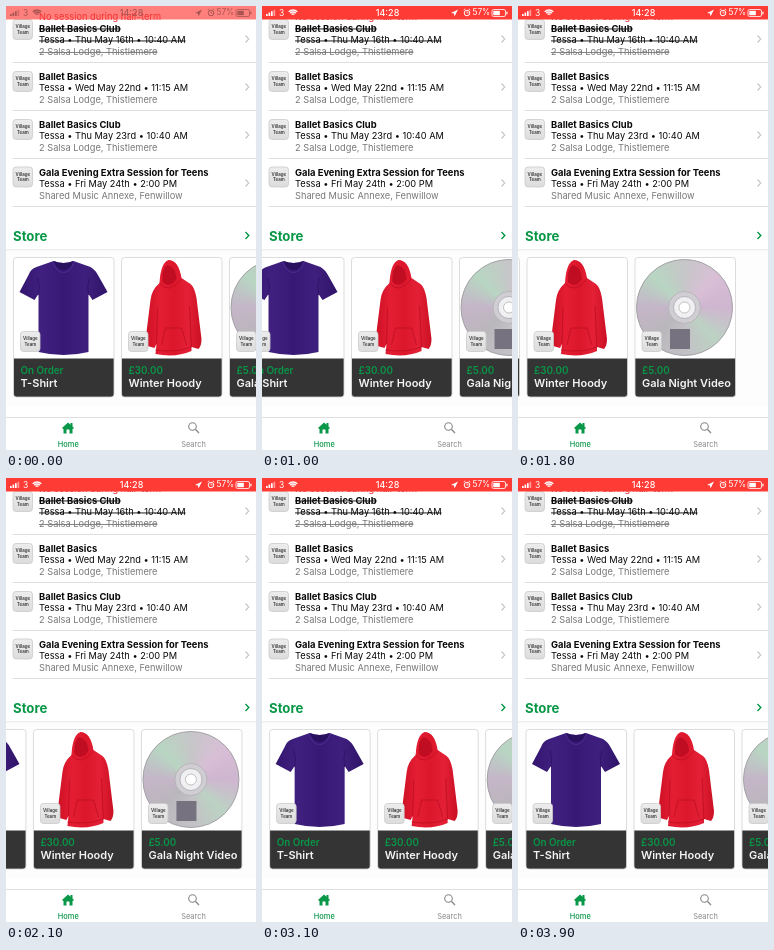
Animation of 250 by 444 pixels, one loop 4 s. Source, as an HTML page with a canvas:

```html
<!DOCTYPE html>
<html lang="en">
<head>
<meta charset="utf-8">
<title>Club app store</title>
<style>
  html, body { margin: 0; width: 100%; height: 100%; overflow: hidden; background: #fff; }
  canvas { display: block; width: 250px; height: 444px; }
</style>
</head>
<body>
<canvas id="stage"></canvas>
<script>
const W = 250, H = 444, LOOP = 4000, STEP = 100;
const FONT = 'Inter, "Liberation Sans", sans-serif';
const GREEN = '#079747', GREY = '#787878';
const canvas = document.getElementById('stage');
const ctx = canvas.getContext('2d');
const ratio = window.devicePixelRatio || 1;
canvas.width = W * ratio;
canvas.height = H * ratio;
ctx.scale(ratio, ratio);

// Scroll position of the shelf: [ms, px], including both overscroll bounces.
const scrollKeys = [
  [0, 0], [700, 0], [1000, 26], [1400, 86], [1800, 106.5], [2200, 83.5],
  [2450, 81], [2550, 80.5], [3400, -31.5], [3650, -10], [3900, -0.5], [4000, 0]
];

const rows = [
  { y: 22, icon: 13.5, struck: true, lines: ['Ballet Basics Club', 'Tessa • Thu May 16th • 10:40 AM', '2 Salsa Lodge, Thistlemere'] },
  { y: 70, icon: 65.5, lines: ['Ballet Basics', 'Tessa • Wed May 22nd • 11:15 AM', '2 Salsa Lodge, Thistlemere'] },
  { y: 118, icon: 113.5, lines: ['Ballet Basics Club', 'Tessa • Thu May 23rd • 10:40 AM', '2 Salsa Lodge, Thistlemere'] },
  { y: 166, icon: 161, lines: ['Gala Evening Extra Session for Teens', 'Tessa • Fri May 24th • 2:00 PM', 'Shared Music Annexe, Fenwillow'] }
];
const products = [
  { price: 'On Order', title: 'T-Shirt', draw: drawShirt },
  { price: '£30.00', title: 'Winter Hoody', draw: drawHoody },
  { price: '£5.00', title: 'Gala Night Video', draw: drawDisc }
];

function text(str, x, y, size, color, weight = 400, align = 'left') {
  ctx.font = `${weight} ${size}px ${FONT}`;
  ctx.textAlign = align;
  ctx.textBaseline = 'middle';
  ctx.fillStyle = color;
  ctx.fillText(str, x, y);
  return ctx.measureText(str).width;
}

function rect(x, y, w, h, color) {
  ctx.fillStyle = color;
  ctx.fillRect(x, y, w, h);
}

function roundRect(x, y, w, h, r, fill, stroke) {
  ctx.beginPath();
  ctx.roundRect(x, y, w, h, r);
  if (fill) { ctx.fillStyle = fill; ctx.fill(); }
  if (stroke) { ctx.strokeStyle = stroke; ctx.lineWidth = 0.8; ctx.stroke(); }
}

function path(d, fill, stroke, width = 1) {
  const p = new Path2D(d);
  if (fill) { ctx.fillStyle = fill; ctx.fill(p); }
  if (stroke) { ctx.strokeStyle = stroke; ctx.lineWidth = width; ctx.stroke(p); }
}

function circle(x, y, r, fill, stroke, width = 1) {
  ctx.beginPath();
  ctx.arc(x, y, r, 0, Math.PI * 2);
  if (fill) { ctx.fillStyle = fill; ctx.fill(); }
  if (stroke) { ctx.strokeStyle = stroke; ctx.lineWidth = width; ctx.stroke(); }
}

function addStops(g, colors) {
  colors.forEach((c, i) => g.addColorStop(i / (colors.length - 1), c));
  return g;
}

function gradient(x0, y0, x1, y1, ...colors) {
  return addStops(ctx.createLinearGradient(x0, y0, x1, y1), colors);
}

function badge(x, y) {
  roundRect(x, y, 19.5, 20, 3, gradient(x, y, x, y + 20, '#ededed', '#dcdcdc'), '#cbcbcb');
  text('Village', x + 9.8, y + 7.5, 4.4, '#333', 600, 'center');
  text('Team', x + 9.8, y + 13, 4.4, '#333', 600, 'center');
}

function chevron(y, color, width = 1.1) {
  path(`M239.5 ${y - 3.5}l3.3 3.5l-3.3 3.5`, null, color, width);
}

// Monotone cubic interpolation through the scroll keys.
function scrollAt(t) {
  const k = scrollKeys;
  const slope = i => (k[i + 1][1] - k[i][1]) / (k[i + 1][0] - k[i][0]);
  const tangent = i => {
    if (i === 0 || i === k.length - 1) return 0;
    const a = slope(i - 1), b = slope(i);
    return a * b <= 0 ? 0 : 2 * a * b / (a + b);
  };
  let i = 0;
  while (i < k.length - 2 && t >= k[i + 1][0]) i++;
  const h = k[i + 1][0] - k[i][0], u = (t - k[i][0]) / h, v = 1 - u;
  return k[i][1] * v * v * (1 + 2 * u) + k[i + 1][1] * u * u * (3 - 2 * u)
    + h * u * v * (tangent(i) * v - tangent(i + 1) * u);
}

function drawRow({ y, icon, struck, lines }) {
  badge(7, icon);
  lines.forEach((line, i) => {
    const ly = y + [0, 12, 23.5][i];
    const color = i === 2 ? GREY : '#080808';
    const w = text(line, 33, ly + 0.7, i ? 9.25 : 9.4, color, i ? 400 : 700);
    if (struck) rect(33, ly + 0.5, w, 0.9, color);
  });
  chevron(y + 11, '#c4c4c4');
  rect(7, y + 34, W - 7, 0.7, '#cfcfcf');
}

// Product art uses card-relative x and stage y.
function drawShirt() {
  path('M40 255Q50 259 60 255L77 261Q82 264 85 270L94 286L79 294L75 288V346Q50 352 25 346V288L21 294L6 286L15 269Q17 263 23 261Z',
    gradient(6, 0, 94, 0, '#331670', '#40207f', '#371975', '#3f1f7e', '#2f1468'));
  path('M40 255Q50 259 60 255Q57 264 50 264Q43 264 40 255Z', '#2a115f');
  path('M39.5 256Q43 266.5 50 266.5Q57 266.5 60.500 256', null, '#4d2c90', 1);
  path('M25 289Q27 280 24 272M75 289Q73 280 76 272', null, '#2a115f', 0.7);
}

function drawHoody() {
  path('M38 277Q39 257 47 254Q57 254 60 272L69 278Q73 281 75 292L80 333Q80 340 77 343L70 341V345Q54 352 34 348L35 338L33 342L26 340Q24 330 26 318L29 294Q30 284 38 277Z',
    gradient(25, 0, 80, 0, '#cf1226', '#e41d33', '#dc172c', '#e42036', '#cb1024'));
  path('M41 276Q40 262 46 259Q54 261 55 273Q48 283 41 276Z', '#c10d21');
  path('M38 277Q47 289 60 273M35 338L36 302M70 341L68 300M40 339L44 322H60L65 339M34 344Q54 347 70 341', null, '#b80e21', 0.7);
}

function drawDisc() {
  const cx = 49.5, cy = 301.5;
  const sheen = addStops(ctx.createConicGradient(-Math.PI / 2, cx, cy), [
    '#c6c6c8', '#d8bfd6', '#cfb6d0', '#bcd2c3', '#c3c1c6', '#b9b7bb', '#c5b5c8', '#b8d6c2', '#c6c6c8'
  ]);
  circle(cx, cy, 48, sheen, '#a3a1a5');
  circle(cx, cy, 16, '#d0ced2', '#b2b0b4', 0.8);
  circle(cx, cy, 11, '#f0eff1', '#a3a1a6', 0.7);
  circle(cx, cy, 5.5, '#fff', '#aaa', 0.7);
  rect(35, 323, 20, 20, '#76727f');
}

function drawCard(product, x) {
  ctx.save();
  ctx.translate(x, 0);
  ctx.save();
  roundRect(0, 251.5, 100.5, 139.500, 3, '#fff');
  ctx.clip();
  product.draw();
  rect(0, 352.5, 101, 39, '#343434');
  ctx.restore();
  roundRect(0, 251.5, 100.5, 139.500, 3, null, '#d4d4d4');
  badge(7, 325.5);
  text(product.price, 7, 365.5, 9.8, GREEN, 600);
  text(product.title, 7, 378, 11, '#f4f4f4', 600);
  ctx.restore();
}

// The bar starts out half faded with dark symbols, then turns solid.
function drawStatus(t) {
  const faded = t < STEP;
  const ink = faded ? '#a85552' : '#fff';
  ctx.save();
  ctx.globalAlpha = faded ? 0.65 : 1;
  rect(0, 0, W, 13.5, '#ff3b36');
  ctx.restore();
  for (let i = 0; i < 4; i++) {
    ctx.globalAlpha = i < 3 ? 1 : 0.5;
    rect(4 + i * 2.5, 8 - i * 1.4, 1.7, 2 + i * 1.4, ink);
  }
  ctx.globalAlpha = 1;
  text('3', 17, 7, 8.5, ink);
  for (const r of [2, 4, 6]) {
    ctx.beginPath();
    ctx.arc(31, 10, r, -Math.PI * 0.75, -Math.PI * 0.25);
    ctx.strokeStyle = ink;
    ctx.lineWidth = 1.4;
    ctx.stroke();
  }
  text('14:28', 125.5, 7, 9, ink, 500, 'center');
  path('M189 7L196 3.500L192.500 10.500L192 7.500Z', ink);
  circle(205, 7, 2.8, null, ink);
  path('M205 5.500V7H206.500M201.700 4L203.200 2.800M208.300 4L206.800 2.800', null, ink, 0.8);
  text('57%', 210.5, 7, 8.3, ink);
  roundRect(230, 3.5, 13.5, 7, 1.5, null, ink);
  rect(231.3, 4.8, 6.5, 4.4, ink);
  rect(244.3, 5.7, 1.2, 2.6, ink);
}

function drawTabs() {
  rect(0, 411, W, 33, '#fff');
  rect(0, 411, W, 0.7, '#d2d2d2');
  path('M56 422L62 416.500L64.500 418.800V417H66.500V420.600L68 422L67 423L66.500 422.500V427.500H63.500V423.500H60.500V427.500H57.500V422.500L57 423Z', GREEN);
  text('Home', 62.3, 438.8, 7.4, GREEN, 500, 'center');
  circle(186.5, 420.5, 3.8, null, '#878787', 1.1);
  path('M189.300 423.300L193 427', null, '#878787', 1.3);
  text('Search', 187.5, 438.8, 7.4, '#878787', 400, 'center');
}

function draw(t) {
  rect(0, 0, W, H, '#fff');
  text('No session during half-term', 33, 11.5, 9.25, '#e8232b');
  rows.forEach(drawRow);
  text('Store', 7, 231, 13.2, GREEN, 700);
  chevron(229.5, GREEN, 1.4);
  rect(0, 244, W, 156, '#fdfdfd');
  rect(0, 243.5, W, 0.7, '#dedede');
  const offset = scrollAt(t);
  products.forEach((p, i) => drawCard(p, 7.5 + i * 108 - offset));
  drawStatus(t);
  drawTabs();
}

const start = performance.now();
function tick(now) {
  const t = Math.max(0, now - start) % LOOP;
  draw(Math.floor(t / STEP) * STEP);
  requestAnimationFrame(tick);
}
tick(start);
</script>
</body>
</html>
```
